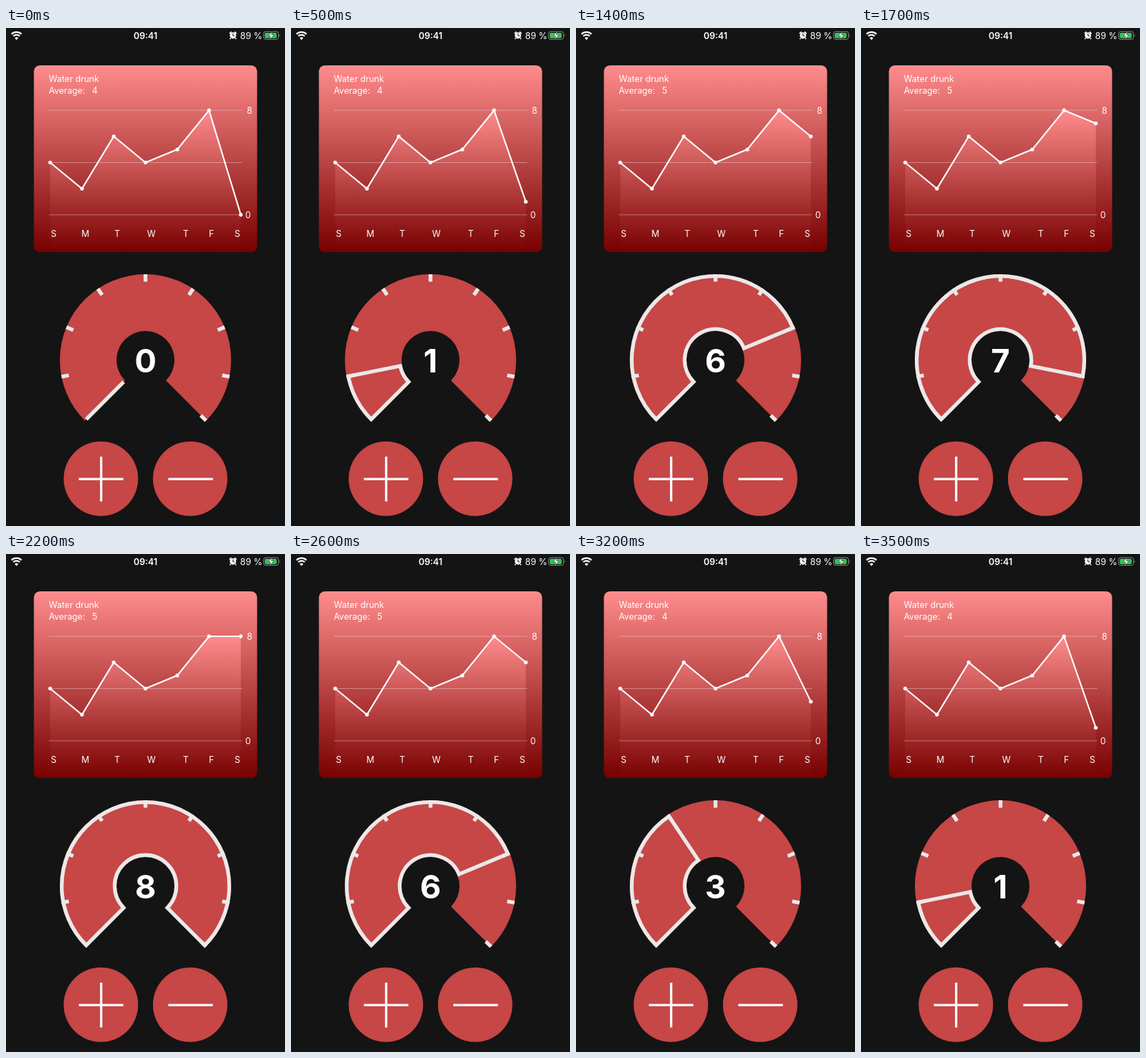
Recreate the animation shown at these times as an HTML page. Size 404 px wide and 720 px high, loop 3.6 s.

```html
<!DOCTYPE html>
<html lang="en">
<head>
<meta charset="utf-8">
<title>Water counter</title>
<style>
  html, body { margin: 0; width: 100%; height: 100%; overflow: hidden; background: #141414; }
  svg { display: block; width: 404px; height: 720px; font-family: Inter, Roboto, sans-serif; }
  text { fill: #fff; }
  .small { font-size: 12.6px; }
  .mid { text-anchor: middle; }
  .red { fill: #c74646; }
  .pale { stroke: #ebe8e8; stroke-width: 5.4; fill: none; stroke-miterlimit: 10; }
  .rule { stroke: #fff; stroke-opacity: .35; stroke-width: 1.1; }
  .sign { stroke: #fff; stroke-width: 3.3; }
</style>
</head>
<body>
<svg viewBox="0 0 404 720">
  <defs>
    <linearGradient id="card" gradientUnits="userSpaceOnUse" x1="0" y1="54" x2="0" y2="324">
      <stop offset="0" stop-color="#ff8c8c"/><stop offset="1" stop-color="#780000"/>
    </linearGradient>
    <linearGradient id="under" gradientUnits="userSpaceOnUse" x1="0" y1="119" x2="0" y2="324">
      <stop offset="0" stop-color="#ff8c8c"/><stop offset="1" stop-color="#780000"/>
    </linearGradient>
  </defs>
  <rect width="404" height="720" fill="#141414"/>

  <!-- status bar -->
  <g fill="none" stroke="#fff" stroke-width="2.2">
    <path d="M8 8.9A10.2 10.2 0 0 1 22.4 8.9"/>
    <path d="M10.6 11.8A6.4 6.4 0 0 1 19.8 11.8"/>
  </g>
  <path d="M15.2 17.2L12.6 14.4A3.8 3.8 0 0 1 17.8 14.4Z" fill="#fff"/>
  <text class="mid" x="202" y="15.5" font-size="12.9" font-weight="600">09:41</text>
  <circle cx="328.7" cy="10.8" r="4.6" fill="#fff"/>
  <path d="M323.6 8.1L326.4 5.4M333.8 8.1L331 5.4M325.4 14.4L324.2 16M332 14.4L333.2 16" stroke="#fff" stroke-width="1.6"/>
  <path d="M328.7 7.8V11.2H331.2" fill="none" stroke="#141414" stroke-width="1"/>
  <text x="339" y="15.7" font-size="12.9">89 %</text>
  <rect x="373" y="5.2" width="21.6" height="11.2" rx="3" fill="none" stroke="#8c8c8c" stroke-width="1"/>
  <rect x="374.7" y="6.9" width="17.2" height="7.8" rx="1.6" fill="#34c759"/>
  <path d="M395.9 8.8Q397.6 10.8 395.9 12.8Z" fill="#8c8c8c"/>
  <path d="M385.6 5.2L379.4 11.4H383.2L381.8 16.4L388.2 10H384.4Z" fill="#fff" stroke="#141414" stroke-width=".5"/>

  <!-- chart -->
  <rect x="40.4" y="54" width="323.2" height="270" rx="8.6" fill="url(#card)"/>
  <path id="area" fill="url(#under)"/>
  <path id="line" fill="none" stroke="#fff" stroke-width="2.2"/>
  <g id="dots" fill="#fff"></g>
  <path class="rule" d="M62 119H342M62 194.5H342M62 270H342"/>
  <g class="small">
    <text x="62" y="78.3">Water drunk</text>
    <text x="62" y="95.4">Average:</text>
    <text class="mid" id="avg" x="128.5" y="95.4"></text>
    <text class="mid" x="352.7" y="123.6">8</text>
    <text class="mid" x="350.4" y="274.6">0</text>
    <g id="days" class="mid"></g>
  </g>

  <!-- gauge -->
  <path id="ring" class="red"/>
  <path id="outline" class="pale"/>
  <path id="ticks" class="pale"/>
  <text class="mid" id="count" x="202" y="498" font-size="47" font-weight="700"></text>

  <!-- buttons -->
  <circle class="red" cx="137.4" cy="651.6" r="53.9"/>
  <circle class="red" cx="266.7" cy="651.6" r="53.9"/>
  <path class="sign" d="M105.5 652.2H170M137.8 619.8V684.4M235 652.2H299.6"/>
</svg>
<script>
  const LOOP = 3600, MAX = 8, CX = 202, CY = 480;
  const $ = id => document.getElementById(id);
  const week = [4, 2, 6, 4, 5, 8, 0];
  const px = i => 64 + 46 * i;
  const py = v => 270 - v * 151 / MAX;

  const angle = n => (135 + 270 * n / MAX) * Math.PI / 180;
  const polar = (r, n) =>
    (CX + r * Math.cos(angle(n))).toFixed(2) + ' ' + (CY + r * Math.sin(angle(n))).toFixed(2);

  // Closed ring sector from mark 0 to mark n.
  function sector(outer, inner, n) {
    const large = n * 270 / MAX > 180 ? 1 : 0;
    return `M${polar(outer, 0)}A${outer} ${outer} 0 ${large} 1 ${polar(outer, n)}` +
      `L${polar(inner, n)}A${inner} ${inner} 0 ${large} 0 ${polar(inner, 0)}Z`;
  }

  const labelX = [69, 115, 161, 210.5, 260.3, 297.5, 335];
  $('days').innerHTML = [...'SMTWTFS']
    .map((d, i) => `<text x="${labelX[i]}" y="301.6">${d}</text>`).join('');
  $('dots').innerHTML = week
    .map((v, i) => `<circle cx="${px(i)}" cy="${py(v)}" r="2.7"/>`).join('');
  $('ring').setAttribute('d', sector(124, 42, MAX));
  $('ticks').setAttribute('d', Array.from({ length: MAX },
    (_, i) => `M${polar(113.2, i + 1)}L${polar(124, i + 1)}`).join(''));

  function countAt(t) {
    if (t < 2100) return Math.min(MAX, Math.max(0, Math.floor((t - 200) / 200)));
    return MAX - Math.floor((t - 2100) / 200);
  }

  function show(n) {
    week[6] = n;
    const line = 'M' + week.map((v, i) => px(i) + ' ' + py(v)).join('L');
    $('line').setAttribute('d', line);
    $('area').setAttribute('d', line + `V324H${px(0)}Z`);
    $('dots').lastElementChild.setAttribute('cy', py(n));
    $('avg').textContent = Math.floor(week.reduce((a, b) => a + b) / week.length);
    $('outline').setAttribute('d', n
      ? sector(121.3, 44.7, n)
      : `M${polar(121.3, 0)}L${polar(44.7, 0)}`);
    $('count').textContent = n;
  }

  let shown = -1;
  function frame() {
    const n = countAt(performance.now() % LOOP);
    if (n !== shown) show(shown = n);
    requestAnimationFrame(frame);
  }
  frame();
</script>
</body>
</html>
```
